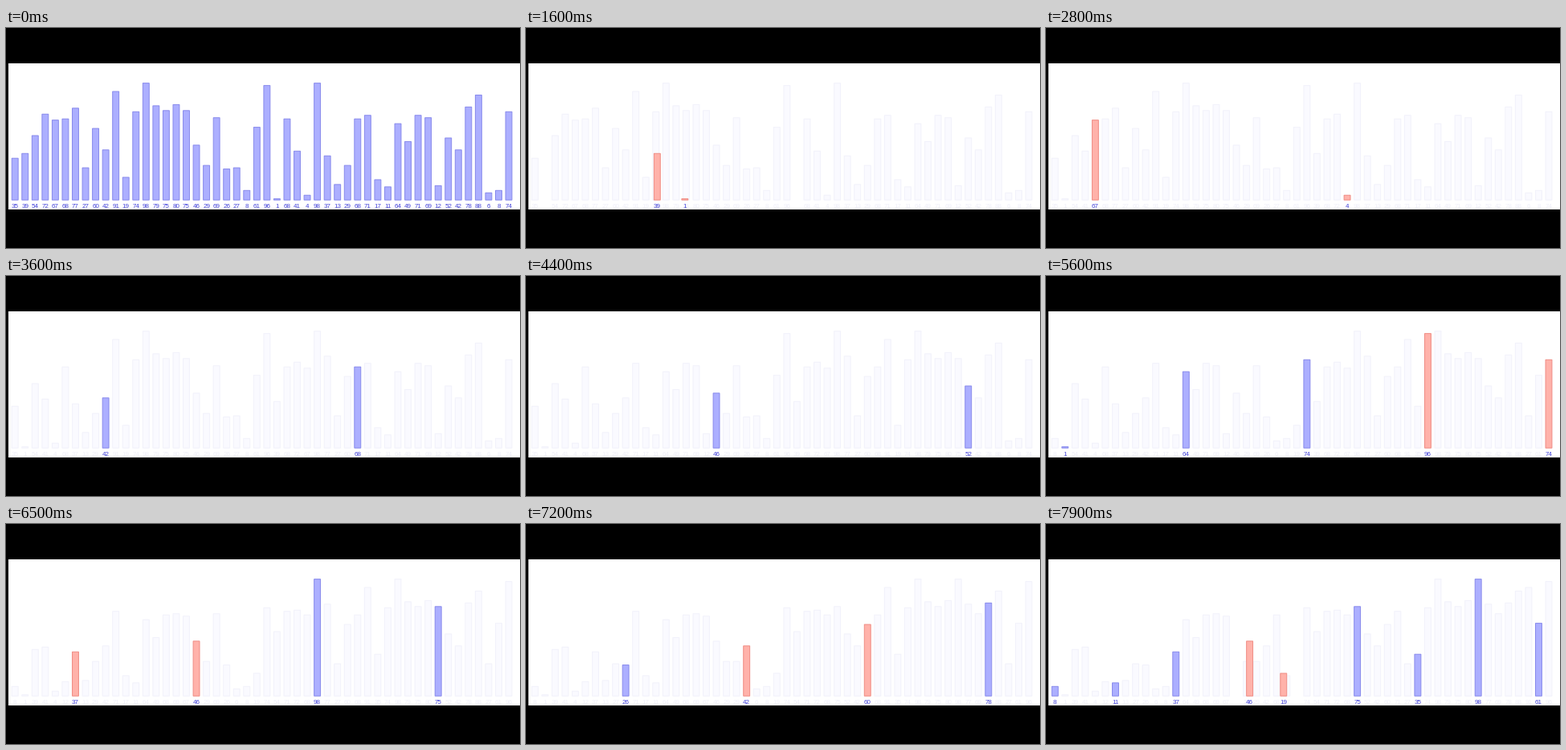
Recreate the animation shown at these times as a matplotlib script. Size 640 by 274 pixels, loop 8000 ms.

```python
import matplotlib.pyplot as plt
import numpy as np
from matplotlib.animation import FuncAnimation
from matplotlib.patches import Rectangle

W, H, DPI = 640, 274, 100
FRAMES, INTERVAL = 80, 100
PX = 72 / DPI

# The list being sorted, as printed under the bars
VALUES = [35, 39, 54, 72, 67, 68, 77, 27, 60, 42, 91, 19, 74, 98, 79, 75, 80,
          75, 46, 29, 69, 26, 27, 8, 61, 96, 1, 68, 41, 4, 98, 37, 13, 29, 68,
          71, 17, 11, 64, 49, 71, 69, 12, 52, 42, 78, 88, 6, 8, 74]
GAPS = (25, 12, 6)

X0, STEP, BAR_W = 11.2, 12.547, 7.9
BASE, UNIT, LABEL_Y = 214.2, 1.485, 221.1

# Each style: fill, edge, label
BLUE = np.array([(172, 175, 255), (136, 138, 236), (68, 68, 218)]) / 255
RED = np.array([(255, 178, 170), (240, 140, 132), (68, 68, 218)]) / 255
GHOST = np.array([(250, 250, 255), (242, 242, 251), (240, 240, 250)]) / 255

# Playback speeds up: frame number -> position in the list of steps
PACE = [(0, 0), (11, 3.95), (16, 4.445), (21, 5.9), (26, 9.05),
        (34, 18.03), (65, 117.95), (79, 163.22)]


def shell_sort(values):
    """List the steps as (values, chain, pair, swapping)."""
    a, steps = list(values), []
    for gap in GAPS:
        for start in range(gap):
            chain = range(start, len(a), gap)
            steps.append((a[:], chain, (), False))
            for i in chain[1:]:
                while i > start:
                    pair = (i - gap, i)
                    steps.append((a[:], chain, pair, False))
                    if a[i - gap] <= a[i]:
                        break
                    steps.append((a[:], chain, pair, True))
                    a[i - gap], a[i] = a[i], a[i - gap]
                    i -= gap
    return steps


steps = shell_sort(VALUES)

fig = plt.figure(figsize=(W / DPI, H / DPI), dpi=DPI, facecolor="black")
ax = fig.add_axes([0, 0, 1, 1])
ax.set_xlim(0, W)
ax.set_ylim(H, 0)
ax.axis("off")
ax.add_patch(Rectangle((3, 44), W - 3, 182, color="white", lw=0))

bars, labels = [], []
for _ in VALUES:
    bars.append(ax.add_patch(Rectangle((0, BASE), BAR_W, 0, lw=PX,
                                       snap=False)))
    labels.append(ax.text(0, LABEL_Y, "", family="Liberation Sans",
                          size=8 * PX, ha="center", va="center_baseline"))


def place(i, value, x, style, z):
    fill, edge, ink = style
    bar, label = bars[i], labels[i]
    bar.set_bounds(x - BAR_W / 2, BASE - value * UNIT, BAR_W, value * UNIT)
    bar.set_facecolor(fill)
    bar.set_edgecolor(edge)
    bar.set_zorder(z)
    label.set_text(str(value))
    label.set_x(x)
    label.set_color(ink)
    label.set_zorder(z)


def draw(frame):
    pos = np.interp(frame, *zip(*PACE))
    values, chain, pair, swapping = steps[int(pos)]
    shift = pos % 1 if swapping else 0
    fade = np.clip((frame - 1) / 8, 0, 1)
    rest = BLUE + (GHOST - BLUE) * fade

    for i, value in enumerate(values):
        x = X0 + i * STEP
        if i in pair:
            other = sum(pair) - i
            place(i, value, x + (other - i) * STEP * shift, RED, 4)
        elif i in chain:
            place(i, value, x, BLUE, 3)
        else:
            place(i, value, x, rest, 2)
    return bars + labels


anim = FuncAnimation(fig, draw, frames=FRAMES, interval=INTERVAL,
                     repeat=True, repeat_delay=0)
plt.show()
```
